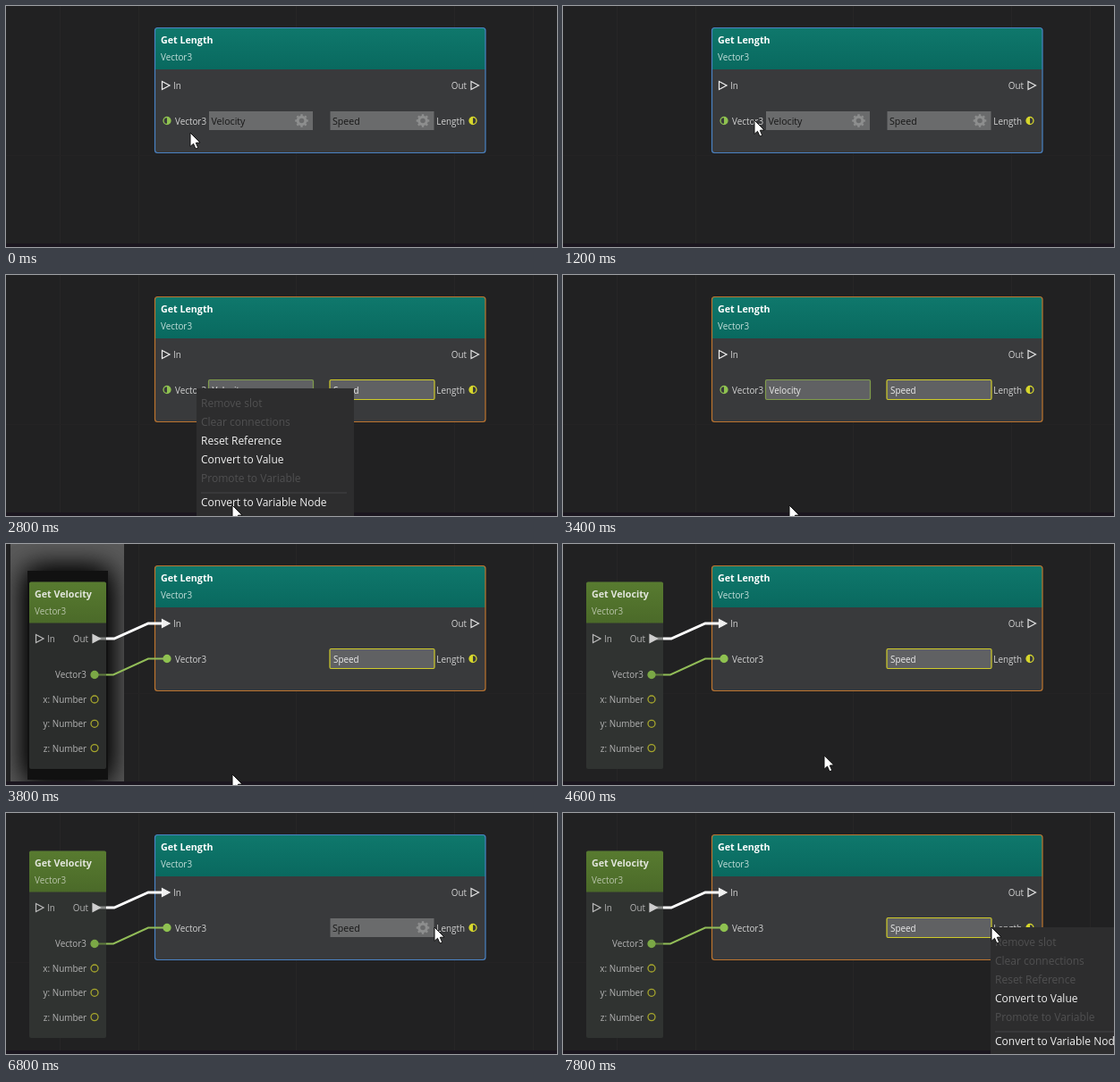
Animation of 616x270 px, one loop 8000 ms. Source, as an HTML page with a canvas:

```html
<!DOCTYPE html>
<html>
<head>
<meta charset="utf-8">
<style>
html, body { margin: 0; overflow: hidden; background: #212122; }
canvas { display: block; }
</style>
</head>
<body>
<canvas id="stage" width="616" height="270"></canvas>
<script>
const ctx = document.getElementById('stage').getContext('2d');
const LOOP = 8000, STEP = 200;
const GREEN = '#8fc250', YELLOW = '#d6d62c', LIGHT = '#d2d2d2';
const MENU = ['Remove slot', 'Clear connections', 'Reset Reference',
  'Convert to Value', 'Promote to Variable', 'Convert to Variable Node'];

// Cursor stops: time, x, y, easing power
const STOPS = [[0, 206, 142, 1], [600, 206, 142, 1], [1200, 214, 128, 1], [1800, 214, 128, 1],
  [2800, 253, 258, 2], [4400, 253, 258, 1], [5400, 448, 152, 1], [6800, 479, 128, 3], [LOOP, 479, 128, 1]];

function cursorAt(t) {
  const i = STOPS.findIndex(s => s[0] > t);
  const [t0, x0, y0] = STOPS[i - 1], [t1, x1, y1, power] = STOPS[i];
  const k = 1 - (1 - (t - t0) / (t1 - t0)) ** power;
  return [x0 + (x1 - x0) * k, y0 + (y1 - y0) * k];
}

function text(str, x, y, color = LIGHT, size = 9.9, weight = 400, align = 'left') {
  ctx.font = `${weight} ${size}px "Open Sans", "Noto Sans", sans-serif`;
  ctx.textAlign = align;
  ctx.fillStyle = color;
  ctx.fillText(str, x, y);
}

function rect(x, y, w, h, fill) {
  ctx.fillStyle = fill;
  ctx.fillRect(x, y, w, h);
}

function box(x, y, w, h, r, fill, stroke) {
  ctx.beginPath();
  ctx.roundRect(x, y, w, h, r);
  if (fill) { ctx.fillStyle = fill; ctx.fill(); }
  if (stroke) { ctx.strokeStyle = stroke; ctx.lineWidth = 1.2; ctx.stroke(); }
}

function line(points, color, width) {
  ctx.beginPath();
  points.forEach(p => ctx.lineTo(...p));
  ctx.strokeStyle = color;
  ctx.lineWidth = width;
  ctx.stroke();
}

function arrow(x, y, color, filled) {
  ctx.beginPath();
  ctx.moveTo(x, y - 4.5);
  ctx.lineTo(x + 8.5, y);
  ctx.lineTo(x, y + 4.5);
  ctx.closePath();
  ctx.strokeStyle = ctx.fillStyle = color;
  ctx.lineWidth = 1.2;
  ctx.stroke();
  if (filled) ctx.fill();
}

// fill: 'none', 'left', 'right' or 'all'
function port(x, y, color, fill) {
  ctx.strokeStyle = ctx.fillStyle = color;
  ctx.lineWidth = 1.3;
  ctx.beginPath();
  ctx.arc(x, y, 4, 0, 7);
  ctx.stroke();
  if (fill === 'none') return;
  ctx.beginPath();
  if (fill === 'all') ctx.arc(x, y, 4, 0, 7);
  else ctx.arc(x, y, 4, -Math.PI / 2, Math.PI / 2, fill === 'left');
  ctx.fill();
}

function gear(x, y) {
  ctx.strokeStyle = '#8d8e8e';
  ctx.lineWidth = 3;
  ctx.beginPath();
  ctx.arc(x, y, 4.3, 0, 7);
  ctx.stroke();
  for (let i = 0; i < 8; i++) {
    const c = Math.cos(i * Math.PI / 4), s = Math.sin(i * Math.PI / 4);
    line([[x + c * 5, y + s * 5], [x + c * 7.3, y + s * 7.3]], '#8d8e8e', 2.4);
  }
}

function field(label, x, color, hover) {
  if (hover) {
    rect(x, 118, 116, 21, '#6a6b6c');
    text(label, x + 2.5, 132.5, '#161616', 10.6);
    gear(x + 103.5, 128.5);
  } else {
    box(x - .5, 117.5, 117, 22, 1.5, '#606163', color);
    text(label, x + 3.5, 132.5, '#ececec');
  }
}

function background() {
  rect(0, 0, 616, 270, '#212122');
  for (const x of [60, 148, 324, 501, 589]) rect(x, 0, 1, 266, '#272626');
  rect(0, 167, 616, 1, '#242324');
}

function lengthNode(hover, connected) {
  box(166.5, 24.5, 369.5, 140, 3, '#393a3c');
  const shade = ctx.createLinearGradient(0, 24, 0, 71);
  shade.addColorStop(0, '#0f786c');
  shade.addColorStop(1, '#09695f');
  box(166.5, 24.5, 369.5, 46.5, [3, 3, 0, 0], shade);
  box(166.5, 24.5, 369.5, 140, 3, null, hover ? '#4a83c4' : '#bd752f');
  text('Get Length', 173, 42, '#fff', 10.7, 700);
  text('Vector3', 173, 61, '#c4dfda');
  arrow(174.5, 89, '#f0f0f0', connected);
  text('In', 187, 92.5);
  text('Out', 515, 92.5, LIGHT, 9.9, 400, 'right');
  arrow(520, 89, '#e4e4e4');
  port(180, 128.5, GREEN, connected ? 'all' : 'right');
  text('Vector3', 189, 132.5);
  if (!connected) field('Velocity', 227, '#809c4c', hover);
  field('Speed', 362.5, '#cfcb2a', hover);
  text('Length', 513, 132.5, LIGHT, 9.9, 400, 'right');
  port(522, 128.5, YELLOW, 'left');
}

function velocityNode(appearing) {
  if (appearing) {
    rect(5, 0, 127, 270, '#5a5a5a');
    ctx.save();
    ctx.beginPath();
    ctx.rect(5, 0, 127, 270);
    ctx.clip();
    ctx.shadowColor = '#000';
    ctx.shadowBlur = 32;
    for (let i = 0; i < 2; i++) rect(24, 30, 90, 234, '#111');
    ctx.restore();
  }
  box(26, 42.5, 86, 209.5, 2, appearing ? '#2b2d2c' : '#303331');
  const shade = ctx.createLinearGradient(0, 42, 0, 88);
  shade.addColorStop(0, '#587b30');
  shade.addColorStop(1, '#4b6a29');
  box(26, 42.5, 86, 46, [2, 2, 0, 0], shade);
  text('Get Velocity', 32, 60, '#e2e6dc', 10.7, 700);
  text('Vector3', 32, 79, '#b9c4aa');
  arrow(33.5, 106, '#bcbcbc');
  text('In', 46, 110, '#b4b4b4');
  text('Out', 92, 110, '#b4b4b4', 9.9, 400, 'right');
  line([[104, 106], [112, 106]], '#868886', 3);
  arrow(97, 106, '#cfcfcf', true);
  line([[99, 146.5], [112, 146.5]], '#607d3d', 2);
  port(99, 146.5, '#7ba846', 'all');
  text('Vector3', 90, 150, '#b4b4b4', 9.9, 400, 'right');
  ['x', 'y', 'z'].forEach((axis, i) => {
    const y = 174 + i * 27.3;
    text(axis + ': Number', 90, y + 4, '#b4b4b4', 9.9, 400, 'right');
    port(99, y, '#a6a62c', 'none');
  });
}

function wires() {
  line([[112, 106], [121, 106], [159, 89], [175, 89]], '#fff', 3);
  line([[112, 146.5], [120, 146.5], [159, 128.5], [180, 128.5]], '#92bd58', 2);
}

function menu(x, y, enabled) {
  rect(x, y, 176, 270 - y, '#2d2d2e');
  MENU.forEach((label, i) => {
    const shift = i === 5 ? 6 : 0;
    text(label, x + 5, y + 21 + i * 21 + shift, enabled.includes(i) ? '#f0f0f0' : '#505051', 12);
  });
  rect(x + 5, y + 116.5, 163, 1, '#454546');
}

function cursor(x, y) {
  ctx.beginPath();
  [[0, 0], [0, 15.5], [3.5, 12.3], [6, 18], [8.7, 16.8], [6.3, 11.3], [11, 11]]
    .forEach(([dx, dy]) => ctx.lineTo(x + dx, y + dy));
  ctx.closePath();
  ctx.fillStyle = '#fff';
  ctx.strokeStyle = '#111';
  ctx.lineWidth = 1;
  ctx.fill();
  ctx.stroke();
}

function draw(now) {
  const t = Math.floor(now % LOOP / STEP) * STEP;
  const connected = t >= 3800;
  const hover = t < 1800 || (t >= 5400 && t < 7200);
  background();
  if (connected) velocityNode(t < 4000);
  lengthNode(hover, connected);
  if (connected) wires();
  if (t >= 1800 && t < 3400) menu(213, 127, [2, 3, 5]);
  if (t >= 7200) menu(478, 128, [3, 5]);
  rect(0, 266, 616, 4, '#1b161f');
  if (t >= 1800 && t < 3400) rect(213, 266, 176, 4, '#2d2d2e');
  if (t >= 7200) rect(478, 266, 138, 4, '#2d2d2e');
  cursor(...cursorAt(t));
  requestAnimationFrame(draw);
}
requestAnimationFrame(draw);
</script>
</body>
</html>
```
